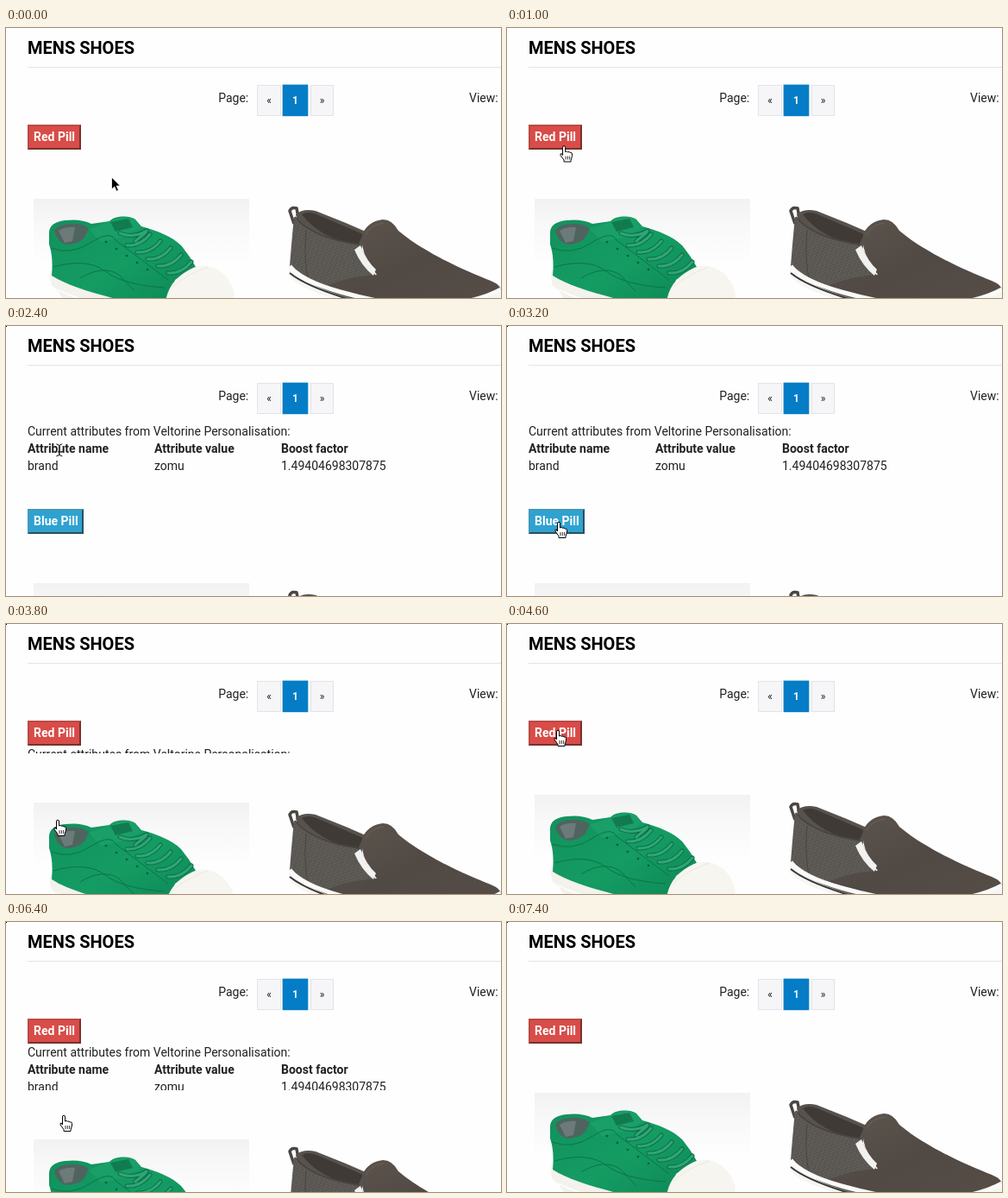
These frames come from a looping animation (574x313 px, 7.6 s). An HTML page:

```html
<!DOCTYPE html>
<html lang="en">
<head>
<meta charset="utf-8">
<title>Mens shoes</title>
<style>
  html, body { margin: 0; width: 100%; height: 100%; overflow: hidden; background: #fefefe; }
  svg { display: block; }
  text { font: 14px Roboto, Arial, sans-serif; fill: #212121; }
  .bold { font-weight: 700; }
  .title { font-size: 20px; font-weight: 700; fill: #000; }
  .page { font-size: 12px; text-anchor: middle; }
  .button text { font-weight: 700; fill: #fff; }
</style>
</head>
<body>
<svg width="574" height="313" viewBox="0 0 574 313">
  <defs>
    <linearGradient id="backdrop" x2="0" y2="1">
      <stop offset="0" stop-color="#f2f2f3"/>
      <stop offset=".12" stop-color="#f8f8f9"/>
      <stop offset=".3" stop-color="#fefefe"/>
    </linearGradient>
    <linearGradient id="suede" x2="1" y2="1">
      <stop offset="0" stop-color="#12915d"/>
      <stop offset=".5" stop-color="#149c63"/>
      <stop offset="1" stop-color="#0d8452"/>
    </linearGradient>
    <linearGradient id="leather" x2="1" y2="1">
      <stop offset="0" stop-color="#5d554e"/>
      <stop offset=".5" stop-color="#514943"/>
      <stop offset="1" stop-color="#564d47"/>
    </linearGradient>
    <pattern id="tweed" width="5" height="4" patternUnits="userSpaceOnUse" patternTransform="rotate(20)">
      <rect width="5" height="4" fill="#5a5753"/>
      <path d="M0 1H2M3 3H5" stroke="#67645f"/>
      <path d="M3 1H4M1 3H2" stroke="#4e4b47"/>
    </pattern>
  </defs>

  <text class="title" x="25" y="30">MENS SHOES</text>
  <path d="M25 45.5H574" stroke="#e3e3e3"/>
  <text x="246.2" y="86">Page:</text>
  <text x="537" y="86">View:</text>
  <g stroke="#e3e3e8" fill="#f6f6f9">
    <rect x="291.5" y="66.5" width="27" height="35"/>
    <rect x="353.5" y="66.5" width="26" height="35"/>
  </g>
  <rect x="320.6" y="65.6" width="29.7" height="36.6" fill="#047dc6"/>
  <text class="page" x="305" y="88">«</text>
  <text class="page bold" x="335.5" y="88" style="fill:#fff">1</text>
  <text class="page" x="366.5" y="88">»</text>

  <g id="shoes">
    <rect x="32" y="198" width="250" height="250" fill="url(#backdrop)"/>
    <g id="sneaker">
      <path d="M51 282Q49 298 60 304Q86 318 122 324L190 335H258Q266 320 264 303L250 350H170Q80 345 60 304Z" fill="#f4f2ec"/>
      <path d="M51 282L53 299Q80 314 122 322L190 330V305L60 278Z" fill="#f4f2ec"/>
      <path d="M50 240C49 229 57 224 69 223Q87 221 99 227L120 224C126 217 144 217 150 222L157 230C176 235 193 242 203 252Q213 264 220 277L196 292L186 330C140 316 80 305 53 287Q55 265 50 251Z" fill="url(#suede)"/>
      <path d="M56 235Q61 227 75 227Q87 226 96 232L91 243Q83 251 70 251Q59 248 56 235Z" fill="#4f645f"/>
      <path d="M61 235Q69 230 80 231L77 247L68 249Z" fill="#6d7a7a"/>
      <path d="M96 233L120 224Q138 215 150 222L156 232L134 243L110 248Z" fill="#199f67"/>
      <path d="M121 225L142 221L147 231L127 236Z" fill="#117b4f"/>
      <path d="M184 330C184 304 194 289 217 278C237 270 259 284 264 306L263 330Z" fill="#f7f5ef"/>
      <path d="M193 300Q211 285 234 277" fill="none" stroke="#ebe8e0"/>
      <g fill="none" stroke="#0b7449">
        <path d="M52 255Q75 264 98 249T127 246L188 292"/>
        <path d="M55 277Q94 266 115 282T184 301"/>
        <path d="M86 290Q112 274 131 286L149 305"/>
      </g>
      <g fill="none" stroke-linecap="round">
        <path id="laces" stroke="#0a6c46" stroke-width="5"/>
        <path id="laceTops" stroke="#2fa576" stroke-width="3"/>
      </g>
      <g id="eyelets" fill="#0a5f3c"/>
    </g>
    <g id="slipon">
      <path d="M328 274L328 286Q336 301 382 314L440 333Q520 346 574 329V300L540 314L440 321Z" fill="#f5f5f3"/>
      <path d="M329 284Q346 298 390 312L450 330Q520 340 574 315" fill="none" stroke="#393735" stroke-width="2"/>
      <path d="M334 227L329 212Q331 207 337 209L339 220" fill="none" stroke="#4a4642" stroke-width="3.5"/>
      <path d="M336 216Q344 209 359 212L394 226L417 236L411 262L380 256L342 237Z" fill="#58524d"/>
      <path d="M343 216Q350 212 360 216L414 239L408 252Q364 244 343 216Z" fill="#403a37"/>
      <path d="M334 219C350 238 382 247 410 251L428 286L438 322C390 315 338 294 329 276Q331 249 334 219Z" fill="url(#tweed)"/>
      <path d="M335 219C350 238 382 247 410 251" fill="none" stroke="#48443f" stroke-width="2"/>
      <path d="M348 234Q345 265 350 291" fill="none" stroke="#484540"/>
      <path d="M413 239Q420 224 437 222Q448 222 455 235C482 258 528 280 562 293Q574 298 574 304C548 322 470 326 410 313Q382 305 373 298Q402 287 430 286Q410 261 413 239Z" fill="url(#leather)"/>
      <path d="M404 257L411 252Q418 270 429 280L426 287Q412 276 404 257Z" fill="#f1f1ef"/>
      <path d="M417 240Q422 228 438 226" fill="none" stroke="#6b625b"/>
      <path d="M329 276Q342 293 388 306T470 321Q538 323 574 303" fill="none" stroke="#fafaf8" stroke-width="5"/>
    </g>
  </g>

  <svg id="panel" x="25" width="549">
    <text x="0" y="15">Current attributes from Veltorine Personalisation:</text>
    <text class="bold" x="0" y="35">Attribute name</text>
    <text class="bold" x="147" y="35">Attribute value</text>
    <text class="bold" x="294" y="35">Boost factor</text>
    <text x="0" y="55">brand</text>
    <text x="147" y="55">zomu</text>
    <text x="294" y="55">1.49404698307875</text>
    <g class="button" transform="translate(0 100)">
      <rect width="65" height="29" fill="#2fa2d0"/>
      <path d="M0 29V0H65L63 2H2V27Z" fill="#4399bb"/>
      <path d="M0 29H65V0L63 2V27H2Z" fill="#2b4f5e"/>
      <text x="7" y="19">Blue Pill</text>
    </g>
  </svg>

  <g id="red" class="button" transform="translate(25 112)">
    <rect id="ring" x="-2" y="-2" width="66" height="33" rx="3" fill="none" stroke="#8dbcf0" stroke-width="4"/>
    <rect width="62" height="29" fill="#d94c48"/>
    <path d="M0 29V0H62L60 2H2V27Z" fill="#b94a46"/>
    <path d="M0 29H62V0L60 2V27H2Z" fill="#743230"/>
    <text x="7" y="19">Red Pill</text>
  </g>

  <rect id="speck" width="1" height="1" fill="#000"/>
  <g id="cursor">
    <path id="arrow" d="M0 0V14L3.3 10.9L5.6 16.2L7.9 15.2L5.7 10H10Z" fill="#000" stroke="#fff" stroke-width=".8"/>
    <g id="beam" fill="none">
      <path d="M-3.5 -7Q0 -7 0 -4V4Q0 7 -3.5 7M3.5 -7Q0 -7 0 -4V4Q0 7 3.5 7M-2 2H2" stroke="#fff" stroke-width="3" opacity=".7"/>
      <path d="M-3.5 -7Q0 -7 0 -4V4Q0 7 -3.5 7M3.5 -7Q0 -7 0 -4V4Q0 7 3.5 7M-2 2H2" stroke="#111"/>
    </g>
    <g id="hand" stroke="#000" stroke-linejoin="round">
      <path d="M-1.5 10V1Q-1.5 -.8 0 -.8T1.6 1V6Q3.2 4.6 4.5 6.3Q6.2 5.3 7.2 7Q9.3 6.3 9.5 8.5V11L8 16V17.5H0V15.5L-4 10Q-4.6 8 -2.8 8Z" fill="#fff"/>
      <path d="M2 11V15M4.3 11V15M6.6 11V15" fill="none" stroke-width=".8"/>
    </g>
  </g>
</svg>
<script>
const LOOP = 7600, STEP = 200, SLIDE = 400, PANEL_HEIGHT = 129;
const opens = [1427, 4923], closes = [3468, 6179];

// time, x, y of the pointer hotspot
const route = [
  [0, 122.5, 173], [1200, 62, 135], [2200, 62, 135], [3200, 60, 228], [3800, 60, 228],
  [4600, 59, 124], [5600, 59, 124], [6200, 67, 225], [6600, 67, 225], [7400, 80, 332]
];
const shapes = [
  [0, 'arrow'], [1000, 'hand'], [1600, 'beam'], [2600, 'arrow'], [3000, 'hand'],
  [4200, 'arrow'], [4400, 'hand'], [5000, 'beam'], [5900, 'arrow'], [6000, 'hand']
];

const $ = id => document.getElementById(id);
const swing = p => 0.5 - Math.cos(Math.PI * Math.min(1, Math.max(0, p))) / 2;
const show = (id, on) => $(id).setAttribute('visibility', on ? 'visible' : 'hidden');
const move = (id, x, y) => $(id).setAttribute('transform', `translate(${x} ${y})`);

function drawLaces() {
  let d = 'M132 238Q148 244 163 235M150 247L162 237';
  let holes = '';
  for (let i = 0; i < 5; i++) {
    const x = 140 + i * 12, y = 252 + i * 8;
    d += `M${x} ${y}Q${x + 16} ${y + 1} ${x + 27} ${y - 13}`;
    holes += `<circle cx="${x - 24}" cy="${y - 4}" r="1.3"/>`;
  }
  $('laces').setAttribute('d', d);
  $('laceTops').setAttribute('d', d);
  $('eyelets').innerHTML = holes;
}

function pointerAt(t) {
  const i = route.findIndex(key => key[0] > t);
  if (i < 0) return route.at(-1).slice(1);
  const [t0, x0, y0] = route[i - 1], [t1, x1, y1] = route[i];
  const p = swing((t - t0) / (t1 - t0));
  return [x0 + (x1 - x0) * p, y0 + (y1 - y0) * p];
}

function render(t) {
  const isOpen = opens.some((start, i) => t >= start && t < closes[i]);
  const height = PANEL_HEIGHT * opens.reduce((sum, start, i) =>
    sum + swing((t - start) / SLIDE) - swing((t - closes[i]) / SLIDE), 0);
  const top = isOpen ? 112 : 141;

  show('red', !isOpen);
  // a hidden group does not hide a child marked visible
  show('ring', !isOpen && opens.some(start => t < start && start - t < STEP));
  $('panel').setAttribute('y', top);
  $('panel').setAttribute('height', Math.max(0, Math.round(height)));
  move('shoes', 0, Math.round(top + height) - 141);
  show('speck', t >= 2400);

  const shape = shapes.findLast(([start]) => t >= start)[1];
  for (const id of ['arrow', 'beam', 'hand']) show(id, id === shape);
  move('cursor', ...pointerAt(t));
}

function tick(now) {
  render(Math.floor(now % LOOP / STEP) * STEP);
  requestAnimationFrame(tick);
}

drawLaces();
render(0);
requestAnimationFrame(tick);
</script>
</body>
</html>
```
